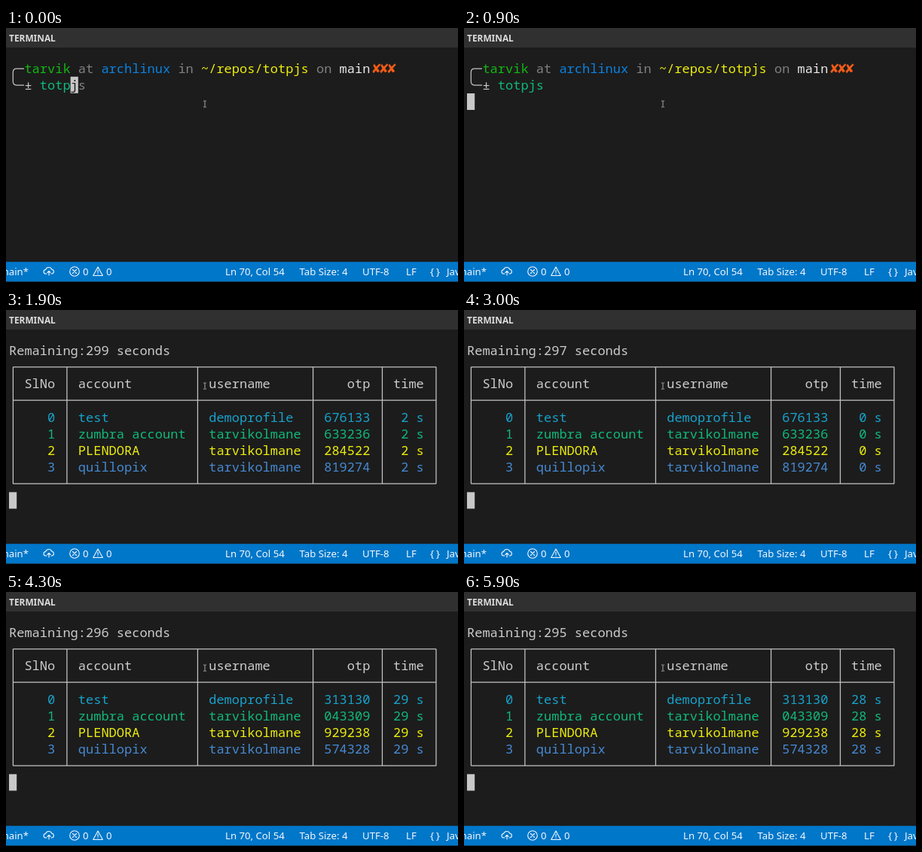
An HTML page for the animation above (6000 ms loop, 600 by 338 pixels).

```html
<!DOCTYPE html>
<html lang="en">
<head>
<meta charset="utf-8">
<title>Terminal</title>
<style>
  html, body { margin: 0; width: 100%; height: 100%; overflow: hidden; background: #1c1c1c; }
  svg { display: block; width: 600px; height: 338px; }
  text { white-space: pre; }
  #screen text { font: 500 17px "Noto Sans Mono", monospace; }
  #screen .mark { font-family: "DejaVu Sans", sans-serif; }
  .bar text { font: 13.2px "Noto Sans", sans-serif; fill: #f4f8fc; }
  .bar .title { font-size: 11.9px; font-weight: 600; fill: #dcdcdc; }
  .line { fill: none; stroke: #c4c4c4; stroke-width: 1.25; }
  .icon { fill: none; stroke: #f4f8fc; stroke-width: 1.1; stroke-linejoin: round; stroke-linecap: round; }
</style>
</head>
<body>
<svg viewBox="0 0 600 338">
  <rect width="600" height="338" fill="#1c1c1c"/>
  <g class="bar">
    <rect width="600" height="26" fill="#303030"/>
    <text class="title" x="4" y="17.6">TERMINAL</text>
  </g>
  <g id="screen"></g>
  <path d="M262 97h1.4l.6.6.6-.6h1.4M264 97.6v7M262 105.2h1.4l.6-.6.6.6h1.4" fill="none" stroke="#aaa"/>
  <g class="bar">
    <rect y="311.2" width="600" height="26.2" fill="#0077c9"/>
    <text x="30" y="328.6" text-anchor="end">main*</text>
    <text x="102" y="328.6">0</text>
    <text x="133" y="328.6">0</text>
    <text x="291" y="328.6">Ln 70, Col 54</text>
    <text x="389.5" y="328.6">Tab Size: 4</text>
    <text x="473" y="328.6">UTF-8</text>
    <text x="531" y="328.6">LF</text>
    <text x="563" y="328.6" letter-spacing="3">{}</text>
    <text x="585" y="328.6">JavaScript</text>
    <g class="icon">
      <path d="M54 327h-1.200a2.700 2.700 0 0 1-.2-5.400a4.300 4.300 0 0 1 8.200-.3a2.900 2.900 0 0 1 .4 5.700H60M57 329v-5.500m-2 2l2-2l2 2"/>
      <circle cx="91" cy="324" r="6.3"/>
      <path d="M88.500 321.500l5 5m0-5l-5 5"/>
      <path d="M122 318l6.300 11.500h-12.600zM122 322v3.500m0 1.700v.4"/>
    </g>
  </g>
</svg>
<script>
const LOOP = 6000, CELL = 10.2, ROW = 22.2, LEFT = 4, TOP = 53.6;
const GREY = '#808080', WHITE = '#cccccc', TEAL = '#10b97c';
const screen = document.getElementById('screen');

const colX = c => LEFT + c * CELL;
const rowY = r => TOP + r * ROW;
const put = (row, col, str, fill = WHITE) =>
  `<text x="${colX(col)}" y="${rowY(row) + 6.3}" fill="${fill}">${str}</text>`;
const line = d => `<path class="line" d="${d}"/>`;
const cursor = (row, col) =>
  `<rect x="${colX(col)}" y="${rowY(row) - 11}" width="${CELL}" height="22" fill="#c8c8c8"/>`;

const COMMAND = 'totpjs';
const PROMPT = [
  [2, 'tarvik', '#12b812'], [9, 'at', GREY], [12, 'archlinux', '#0a82e2'],
  [22, 'in', GREY], [25, '~/repos/totpjs', '#eded0c'], [40, 'on', GREY], [43, 'main', '#e8e8e8']
];
const ACCOUNTS = [
  ['test', 'demoprofile', '#18a2cb'],
  ['zumbra account', 'tarvikolmane', TEAL],
  ['PLENDORA', 'tarvikolmane', '#eded0c'],
  ['quillopix', 'tarvikolmane', '#4689d2']
];
const CODES = [
  ['676133', '633236', '284522', '819274'],
  ['313130', '043309', '929238', '574328']
];

function prompt(typed, entered) {
  const marks = [47, 48, 49].map(c =>
    `<text class="mark" x="${colX(c) + 1}" y="60" fill="#f25c16">✘</text>`).join('');
  const at = 4 + typed;
  return line('M24 54H14Q9.300 54 9.300 59V71Q9.300 76 14 76H24')
    + PROMPT.map(([col, str, fill]) => put(0, col, str, fill)).join('') + marks
    + put(1, 2, '±')
    + put(1, 4, COMMAND.slice(0, typed), TEAL)
    + put(1, at + 1, COMMAND.slice(typed + 1), GREY)
    + (entered ? cursor(2, 0) : cursor(1, at) + put(1, at, COMMAND[typed] || '', '#1c1c1c'));
}

function table(remaining, seconds, codes) {
  const [y0, y1, y2] = [1, 3, 8].map(rowY);
  const xs = [0, 7, 24, 39, 48, 55].map(c => 9.4 + c * 10.21);
  const grid = [y0, y1, y2].map(y => `M${xs[0]} ${y}H${xs[5]}`).join('')
    + xs.map(x => `M${x} ${y0}V${y2}`).join('');
  const head = [[2, 'SlNo'], [9, 'account'], [26, 'username'], [44, 'otp'], [50, 'time']];
  const rows = ACCOUNTS.map(([name, user, fill], i) => {
    const cells = [[5, i], [9, name], [26, user], [41, codes[i]], [50, `${seconds} s`.padStart(4)]];
    return cells.map(([col, str]) => put(4 + i, col, str, fill)).join('');
  });
  return put(0, 0, `Remaining:${remaining} seconds`) + line(grid)
    + head.map(([col, str]) => put(2, col, str)).join('') + rows.join('') + cursor(9, 0);
}

const STEPS = [
  [0, () => prompt(4)],
  [100, () => prompt(5)],
  [200, () => prompt(6)],
  [500, () => prompt(6, true)],
  [1000, () => table(299, 2, CODES[0])],
  [2000, () => table(298, 1, CODES[0])],
  [3000, () => table(297, 0, CODES[0])],
  [4000, () => table(296, 29, CODES[1])],
  [5000, () => table(295, 28, CODES[1])]
];

let shown;
const start = performance.now();
function tick(now) {
  const t = Math.max(0, now - start) % LOOP;
  const step = STEPS.findLast(([from]) => t >= from);
  if (step !== shown) {
    shown = step;
    screen.innerHTML = step[1]();
  }
  requestAnimationFrame(tick);
}
tick(start);
</script>
</body>
</html>
```
